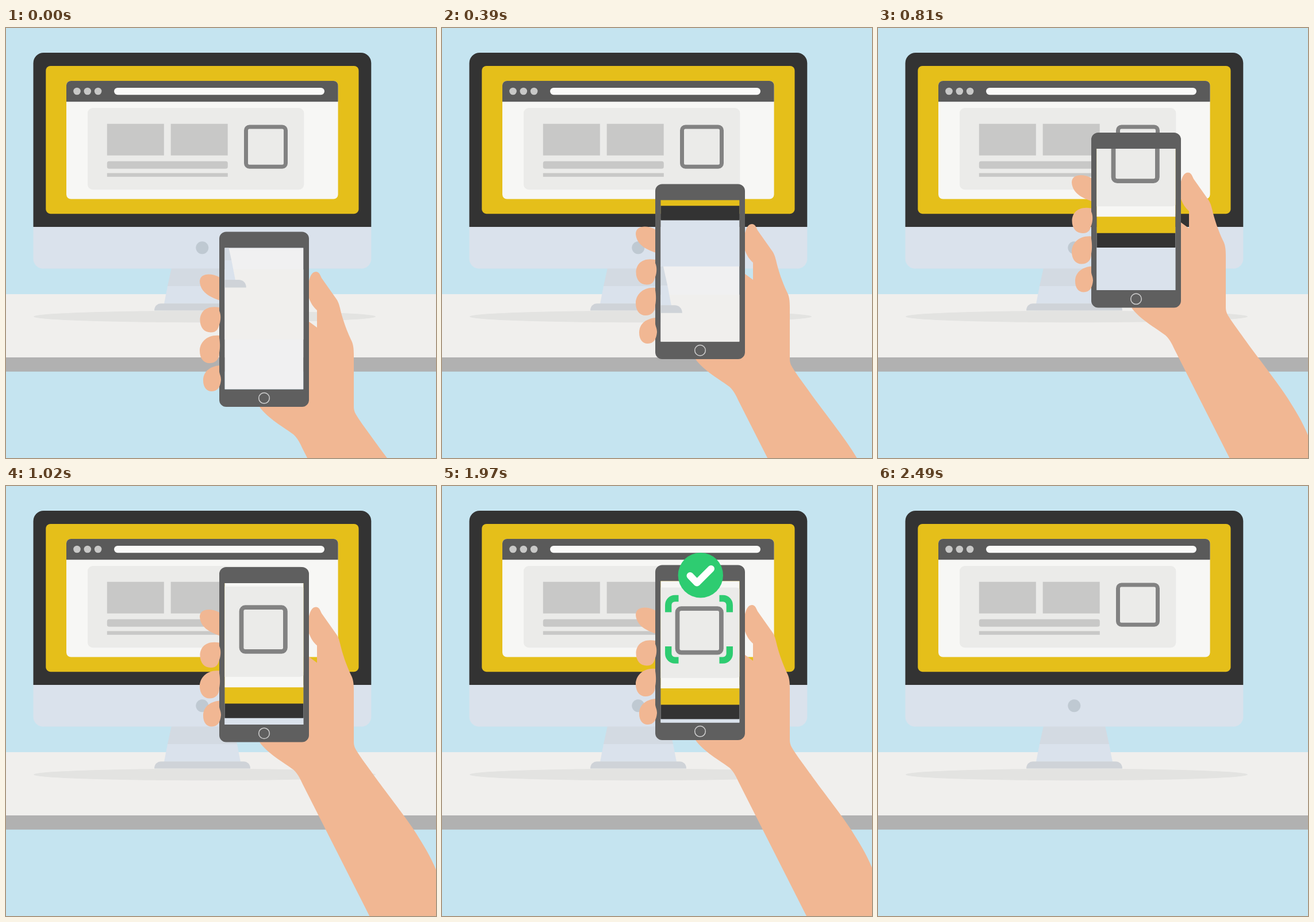
Write an HTML page that moves like this. It is 748x748 px and loops after 2520 ms.

```html
<!DOCTYPE html>
<html lang="en">
<head>
<meta charset="utf-8">
<title>Scan with phone</title>
<style>
  html, body { margin: 0; width: 100%; height: 100%; overflow: hidden; background: #c5e4f0; }
  svg { display: block; width: 100vw; height: 100vh; }
</style>
</head>
<body>
<svg viewBox="0 0 748 748">
  <defs>
    <clipPath id="glass"><rect x="380.5" y="165.5" width="136.8" height="246"/></clipPath>
    <path id="corner" d="M393.7 219.5V207a11.5 11.5 0 0 1 11.5-11.5H411.5"/>
    <g id="computer">
      <path fill="#d3dae2" d="M288 417H395L402 449H281Z"/>
      <path fill="#dae2ec" d="M281 449H402L408 480H275Z"/>
      <path fill="#cfd3d8" d="M258 491.5C258 484 263 479.3 270 479.3H413C420 479.3 425 484 425 491.5Z"/>
      <path fill="#dae2ec" d="M47.5 345H635.3V401.5a17 17 0 0 1-17 17H64.5a17 17 0 0 1-17-17Z"/>
      <path fill="#333" d="M47.5 346V61a18 18 0 0 1 18-18H617.3a18 18 0 0 1 18 18V346Z"/>
      <rect x="69.3" y="66" width="544.2" height="257.2" rx="8" fill="#e5bf1a"/>
      <circle cx="341.3" cy="382.3" r="11" fill="#bfc9d2"/>
      <rect x="105" y="92" width="472.6" height="205.5" rx="8" fill="#f7f7f5"/>
      <path fill="#5a5a5a" d="M105 128.3V100a8 8 0 0 1 8-8H569.6a8 8 0 0 1 8 8V128.3Z"/>
      <g fill="#c8c8c7">
        <circle cx="123.5" cy="110" r="6.3"/>
        <circle cx="141.8" cy="110" r="6.3"/>
        <circle cx="160.1" cy="110" r="6.3"/>
      </g>
      <rect x="188" y="104" width="366" height="12.2" rx="6.1" fill="#fafaf9"/>
      <rect x="142" y="139" width="376.3" height="142.2" rx="9" fill="#ebebe9"/>
      <g fill="#c8c8c7">
        <rect x="175.8" y="166.7" width="99" height="55"/>
        <rect x="286.7" y="166.7" width="99" height="55"/>
        <rect x="175.8" y="231.8" width="210" height="13" rx="3.5"/>
        <rect x="175.8" y="252.4" width="210" height="6.4"/>
      </g>
      <rect x="417.5" y="172" width="69" height="69.3" rx="6" fill="none" stroke="#828282" stroke-width="7"/>
    </g>
  </defs>

  <rect width="748" height="748" fill="#c5e4f0"/>
  <rect y="463" width="748" height="110" fill="#f0efed"/>
  <rect y="573" width="748" height="24.7" fill="#b1b1b1"/>
  <ellipse cx="345.5" cy="502" rx="297.5" ry="10.3" fill="#e3e3e1"/>
  <use href="#computer"/>

  <g id="device">
    <g id="shell">
      <path fill="#f1b793" d="M441 442C455 462 484 478 500 490C508 497 512 507 516 515L634 748H748V664
        C738 640 728 624 713 600C695 572 660 528 640 500C625 479 612 462 607 452C605 447 605 444 605 440
        V352C605 340 604 332 600 325C592 308 585 288 581 270C579 262 577 257 573 252L549 218
        C546 212 545 207 539 207C532 207 528 216 526 228V250C530 262 535 269 541 274V304L526 293L519 300V430Z"/>
      <path fill="#f1b793" d="M372 217C356 208 337 210 337 224C338 242 354 251 372 257Z"/>
      <path fill="#5f5f5f" fill-rule="evenodd" d="M383 137.5H515a12 12 0 0 1 12 12V430a12 12 0 0 1-12 12H383
        a12 12 0 0 1-12-12V149.500a12 12 0 0 1 12-12ZM380.5 165.5V411.5H517.3V165.5Z"/>
      <circle cx="449" cy="426.800" r="9.3" fill="none" stroke="#d0d0d0" stroke-width="1.5"/>
      <g fill="#f1b793">
        <path d="M371 269C347 265 337.500 278 337.500 291C337.500 304 345 312.500 356 312.500C367 312.500 369 306 371 299C374 291 374 281 371 275Z"/>
        <path d="M371 318C350 316 337 330 337 344.500C337 358 344 366 354 366C364 366 371 360 371 348C373 338 372 328 371 322Z"/>
        <path d="M371 370C353 372 343 382 343 396C343 408 349 415 358 415C369 415 373 406 374 395C374 388 371 384 371 380Z"/>
      </g>
    </g>
    <g id="screen">
      <g clip-path="url(#glass)">
        <rect x="380.5" y="165.5" width="136.8" height="246" fill="#f0f0f1"/>
        <g id="view">
          <rect y="463" width="748" height="110" fill="#f0efed"/>
          <use href="#computer"/>
        </g>
      </g>
    </g>
  </g>

  <g id="brackets" fill="none" stroke="#2ecc71" stroke-width="11.3">
    <use href="#corner"/>
    <use href="#corner" transform="matrix(-1 0 0 1 894 0)"/>
    <use href="#corner" transform="matrix(1 0 0 -1 0 498.6)"/>
    <use href="#corner" transform="matrix(-1 0 0 -1 894 498.6)"/>
  </g>
  <g id="badge">
    <circle cx="449.800" cy="155.200" r="39.2" fill="#2ecc71"/>
    <path d="M431.500 156L443.500 168.500L468 144" fill="none" stroke="#fff" stroke-width="12" stroke-linecap="round" stroke-linejoin="round"/>
  </g>
</svg>
<script>
const LOOP = 2520, STEP = 30, RISE = 217, ZOOM = 1.107;
const el = id => document.getElementById(id);
const device = el('device'), shell = el('shell'), screen_ = el('screen');
const view = el('view'), brackets = el('brackets'), badge = el('badge');

const clamp = v => Math.max(0, Math.min(1, v));
// Progress in whole steps; the first step is already visible at `start`.
const steps = (t, start, count) => clamp((Math.floor((t - start) / STEP) + 1) / count);

// Steady travel that brakes over the last quarter.
function travel(u) {
  const speed = 1.06, turn = 0.75;
  if (u <= turn) return speed * u;
  const from = speed * turn, s = (u - turn) / (1 - turn);
  return from + speed * (1 - turn) * s * (1 - s) ** 2 + (1 - from) * s * s * (3 - 2 * s);
}

function draw(t) {
  const p = travel(steps(t, 30, 36));
  const down = RISE * (1 - p);
  const fade = t < 2370 ? 1 : 0.75 * (1 - steps(t, 2400, 4));

  device.setAttribute('transform', `translate(0 ${down})`);
  shell.setAttribute('opacity', fade);
  screen_.setAttribute('opacity', fade ** 1.3);
  // The camera picture moves against the phone.
  const vx = 447.7 - 452 * ZOOM, vy = -92.5 + 115.1 * p - down;
  view.setAttribute('transform', `matrix(${ZOOM} 0 0 ${ZOOM} ${vx} ${vy})`);

  brackets.setAttribute('opacity', steps(t, 1110, 4) * fade);
  const b = steps(t, 1460, 18);
  badge.setAttribute('opacity', b * fade);
  badge.setAttribute('transform', `translate(0 ${39 * (1 - b)})`);
}

const begin = performance.now();
function tick() {
  draw((performance.now() - begin) % LOOP);
  requestAnimationFrame(tick);
}
draw(0);
requestAnimationFrame(tick);
</script>
</body>
</html>
```
